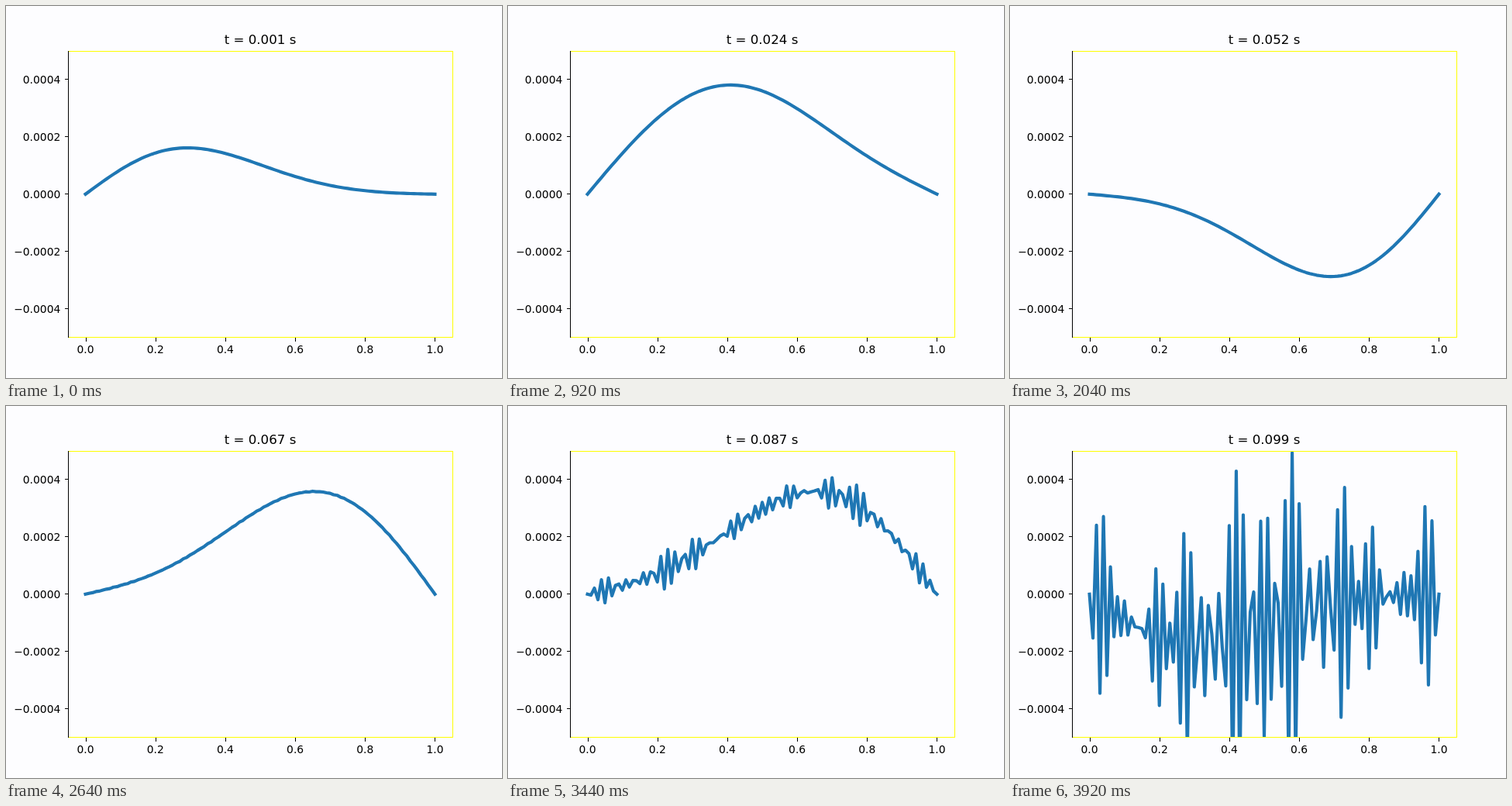
These frames come from a looping animation (640 by 480 pixels, 3960 ms). An HTML page with a canvas:

```html
<!DOCTYPE html>
<html lang="en">
<head>
<meta charset="utf-8">
<title>Vibrating string</title>
<style>
  html, body { margin: 0; width: 100%; height: 100%; overflow: hidden; background: #fdfdff; }
  canvas { display: block; }
</style>
</head>
<body>
<canvas id="stage" width="640" height="480"></canvas>
<script>
const ctx = document.getElementById('stage').getContext('2d');

// Wave equation for a struck string, explicit Euler (which slowly goes unstable).
const CELLS = 100, SPEED = 100, STEP = 1e-6, STEPS_PER_FRAME = 1000;
const FRAMES = 99, FRAME_MS = 40;

function simulate() {
  const coupling = STEP * (SPEED * CELLS) ** 2;
  let phi = new Float64Array(CELLS + 1), nextPhi = new Float64Array(CELLS + 1);
  const psi = Float64Array.from(phi, (_, i) => {
    const x = i / CELLS;
    return x * (1 - x) * Math.exp(-((x - 0.1) ** 2) / (2 * 0.3 ** 2));
  });
  const shots = [];
  for (let frame = 0; frame < FRAMES; frame++) {
    for (let s = 0; s < STEPS_PER_FRAME; s++) {
      for (let i = 1; i < CELLS; i++) {
        nextPhi[i] = phi[i] + STEP * psi[i];
        psi[i] += coupling * (phi[i + 1] + phi[i - 1] - 2 * phi[i]);
      }
      [phi, nextPhi] = [nextPhi, phi];
    }
    shots.push(phi.slice());
  }
  return shots;
}

const INK = '#000', YELLOW = '#ffff00', BLUE = '#1f77b4', PAPER = '#fdfdff';
const LEFT = 80, TOP = 58, WIDTH = 496, HEIGHT = 369.6;
const toX = x => LEFT + WIDTH * (x + 0.05) / 1.1;
const toY = y => TOP + HEIGHT * (0.0005 - y) / 0.001;

function box(color, x, y, w, h) {
  ctx.fillStyle = color;
  ctx.fillRect(x, y, w, h);
}

function text(str, x, y, size, align) {
  ctx.fillStyle = INK;
  ctx.font = `${size}px "DejaVu Sans", sans-serif`;
  ctx.textAlign = align;
  ctx.fillText(str, x, y);
}

function drawAxes() {
  box(YELLOW, 80, 58, 497, 1);
  box(YELLOW, 576, 58, 1, 370);
  box(YELLOW, 80, 427, 497, 1);
  box(INK, 80, 58, 1, 370);
  for (let i = 0; i <= 5; i++) {
    const x = toX(i / 5);
    box(INK, Math.round(x), 428, 1, 5);
    text((i / 5).toFixed(1), x, 448, 13.89, 'center');
  }
  for (let i = -2; i <= 2; i++) {
    const value = i * 0.0002, y = Math.floor(toY(value));
    box(INK, 76, y, 5, 1);
    text(value.toFixed(4).replace('-', '\u2212'), 70.3, y + 5.5, 13.89, 'right');
  }
}

function drawString(phi) {
  ctx.save();
  ctx.beginPath();
  ctx.rect(LEFT, TOP, WIDTH, HEIGHT);
  ctx.clip();
  ctx.beginPath();
  phi.forEach((y, i) => ctx.lineTo(toX(i / CELLS), toY(y)));
  ctx.strokeStyle = BLUE;
  ctx.lineWidth = 4.17;
  ctx.lineJoin = 'round';
  ctx.lineCap = 'square';
  ctx.stroke();
  ctx.restore();
}

const shots = simulate();

function draw() {
  const frame = Math.floor(performance.now() / FRAME_MS) % FRAMES;
  box(PAPER, 0, 0, 640, 480);
  drawString(shots[frame]);
  drawAxes();
  text(`t = ${(frame + 1) / 1000} s`, 328, 49, 16.67, 'center');
  requestAnimationFrame(draw);
}
draw();
</script>
</body>
</html>
```
